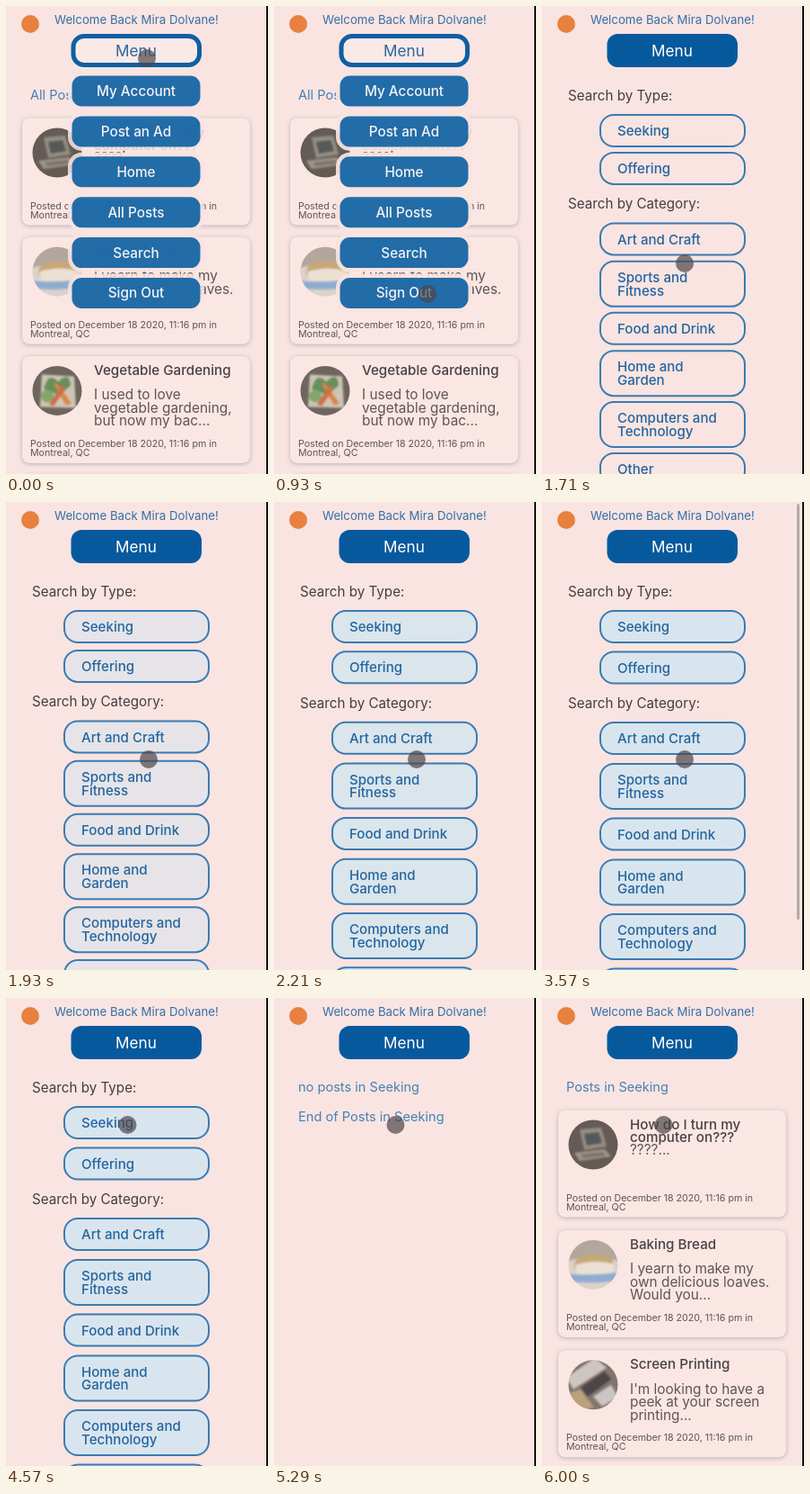
An HTML page that plays this animation: 292 by 520 pixels, repeating every 6.07 s.

```html
<!DOCTYPE html>
<html lang="en">
<head>
<meta charset="utf-8">
<title>Posts and search</title>
<style>
  html, body { margin: 0; width: 100%; height: 100%; overflow: hidden; background: #f9e4e1; }
  svg { display: block; width: 292px; height: 520px; font-family: Inter, "Open Sans", sans-serif; }
  .card { fill: #fae6e3; filter: drop-shadow(0 1px 2.5px rgba(50, 80, 120, .35)); }
  .photo { filter: blur(.8px); }
  .note { font-size: 10.65px; fill: #5d5557; }
  .body { font-size: 15.4px; fill: #5d5557; }
  .title { font-size: 15.2px; font-weight: 500; fill: #484144; }
  .label { font-size: 15.2px; fill: #443d41; }
  .blue { font-size: 14.6px; fill: #4580b5; }
  .item { font-size: 15.3px; font-weight: 500; fill: #f4f2f4; text-anchor: middle; }
  .choice { font-size: 15.1px; font-weight: 500; fill: #23659f; }
</style>
</head>
<body>
<svg viewBox="0 0 292 520">
  <defs>
    <clipPath id="round"><circle r="27.5"/></clipPath>
    <g id="computer" class="photo">
      <rect x="-30" y="-30" width="60" height="60" fill="#645b57"/>
      <path d="M-15-17 9-19 15 2-10 6Z" fill="#968d82"/>
      <path d="M-10-12 6-14 10-2-7 1Z" fill="#56595a"/>
      <path d="M-21 9 13 5 20 13-15 18Z" fill="#a0968b"/>
      <path d="M-14 11 11 8 14 12-11 15Z" fill="#7d746c"/>
    </g>
    <g id="bread" class="photo">
      <rect x="-30" y="-30" width="60" height="60" fill="#b3a69c"/>
      <path d="M-30-4Q0-12 30-4V30H-30Z" fill="#dcd2cb"/>
      <path d="M-21 4Q-22-10-6-11Q12-14 22-5V5Z" fill="#c7a878"/>
      <path d="M-20 0Q2-7 23-1V9L-18 12Z" fill="#ebe0d3"/>
      <path d="M-30 10Q0 13 30 8V17Q0 22-30 18Z" fill="#8facd0"/>
    </g>
    <g id="garden" class="photo">
      <rect x="-30" y="-30" width="60" height="60" fill="#6e655e"/>
      <path d="M-17-18 19-16 21 19-19 18Z" fill="#cfc5b5"/>
      <path d="M-15-2Q-10-22 1-10Q14-22 15-6L3 5Z" fill="#668f5c"/>
      <path d="M-5-9 1-7 16 14 10 16Z" fill="#d98748"/>
      <path d="M5-6 10-3-4 17-9 15Z" fill="#ce6f48"/>
      <circle cx="-11" cy="6" r="7" fill="#84a668"/>
    </g>
    <g id="print" class="photo">
      <rect x="-30" y="-30" width="60" height="60" fill="#81756f"/>
      <path d="M-30-8 2-30 15-19-22 5Z" fill="#cfc5c0"/>
      <path d="M-14 3 13-15 20-6-6 13Z" fill="#4d4546"/>
      <path d="M-30 10-14 5 1 25-18 30Z" fill="#bba07a"/>
      <path d="M0 13 20 0 28 14 10 24Z" fill="#cbc5c3"/>
    </g>
  </defs>
  <rect width="292" height="520" fill="#f9e4e1"/>
  <g id="page">
    <g id="all"></g>
    <g id="seeking"></g>
    <g id="search"></g>
    <g id="empty"></g>
    <g id="header"></g>
    <g id="menu"></g>
  </g>
  <rect id="thumb" x="284" width="3" height="462" rx="1.5" fill="#b5a9a8"/>
  <circle id="cursor" r="10" fill="#4b4648" opacity=".7"/>
  <rect x="290" width="2" height="520" fill="#161214"/>
</svg>
<script>
const LOOP = 6070;
const $ = id => document.getElementById(id);
const set = (el, attrs) => { for (const k in attrs) el.setAttribute(k, attrs[k]); };
const show = (id, on) => set($(id), { display: on ? "inline" : "none" });

function add(parent, tag, attrs, text) {
  const el = document.createElementNS("http://www.w3.org/2000/svg", tag);
  set(el, attrs);
  if (text) el.textContent = text;
  return parent.appendChild(el);
}
const write = (parent, cls, x, y, text) => add(parent, "text", { class: cls, x, y }, text);

// Smooth interpolation through [time, value] stops.
function track(t, stops) {
  if (t <= stops[0][0]) return stops[0][1];
  for (let i = 1; i < stops.length; i++) {
    const [a, v] = stops[i - 1], [b, w] = stops[i];
    if (t < b) {
      const p = (t - a) / (b - a);
      return v + (w - v) * p * p * (3 - 2 * p);
    }
  }
  return stops[stops.length - 1][1];
}
const easeOut = (t, start, span) => 1 - (1 - Math.min(1, Math.max(0, (t - start) / span))) ** 2;

function makeCards(id, heading, posts) {
  write($(id), "blue", 27, 104, heading);
  return [...posts, null].map(post => {
    const g = add($(id), "g", {});
    add(g, "rect", { class: "card", x: 18, width: 254, height: 119, rx: 8 });
    if (post) {
      const [image, titles, lines] = post;
      const pic = add(g, "g", { transform: "translate(57 38.5)", "clip-path": "url(#round)" });
      add(pic, "use", { href: "#" + image });
      titles.forEach((s, i) => write(g, "title", 98, 21 + i * 14.5, s));
      const top = titles.length > 1 ? 49.5 : 48.5;
      lines.forEach((s, i) => write(g, "body", 98, top + i * 14.5, s));
      write(g, "note", 27, 101, "Posted on December 18 2020, 11:16 pm in");
      write(g, "note", 27, 111, "Montreal, QC");
    }
    return g;
  });
}
const placeCards = (cards, pitch) =>
  cards.forEach((g, i) => set(g, { transform: `translate(0 ${124.5 + i * pitch})` }));

const computer = ["computer", ["How do I turn my", "computer on???"], ["????..."]];
const bread = ["bread", ["Baking Bread"], ["I yearn to make my", "own delicious loaves.", "Would you..."]];
const allCards = makeCards("all", "All Posts", [computer, bread,
  ["garden", ["Vegetable Gardening"], ["I used to love", "vegetable gardening,", "but now my bac..."]]]);
const seekingCards = makeCards("seeking", "Posts in Seeking", [computer, bread,
  ["print", ["Screen Printing"], ["I'm looking to have a", "peek at your screen", "printing..."]]]);
placeCards(allCards, 132.2);

write($("empty"), "blue", 27, 104, "no posts in Seeking");
write($("empty"), "blue", 27, 137, "End of Posts in Seeking");

// Header
add($("header"), "circle", { cx: 27, cy: 20, r: 10, fill: "#e8813f" });
set(write($("header"), "blue", 54, 20, "Welcome Back Mira Dolvane!"), { style: "font-size:13.25px;fill:#346fa8" });
const menuButton = add($("header"), "rect", { rx: 12 });
const menuText = add($("header"), "text",
  { x: 145, y: 55.8, "text-anchor": "middle", "font-size": 17.2 }, "Menu");

// Open menu: slightly see-through buttons, each with a page-coloured rim
const items = ["My Account", "Post an Ad", "Home", "All Posts", "Search", "Sign Out"];
const itemBox = (i, grow, attrs) => add($("menu"), "rect", {
  x: 73.5 - grow, y: 77.5 + i * 44.9 - grow, width: 143 + 2 * grow, height: 34 + 2 * grow, rx: 11 + grow, ...attrs
});
const rims = items.map((s, i) => itemBox(i, 4.5, { fill: "#f9e4e1" }));
items.forEach((s, i) => {
  itemBox(i, 0, { fill: "#1565a5", opacity: .94 });
  write($("menu"), "item", 145, 99.9 + i * 44.9, s);
});

// Search form: final top, number of gaps above, lines of text
write($("search"), "label", 29, 104.5, "Search by Type:");
const categoryLabel = write($("search"), "label", 29, 229, "Search by Category:");
const choices = [
  [121, 0, "Seeking"], [166.5, 1, "Offering"], [245, 1, "Art and Craft"],
  [291, 2, "Sports and", "Fitness"], [351.5, 3, "Food and Drink"],
  [397.5, 4, "Home and", "Garden"], [458, 5, "Computers and", "Technology"], [518.5, 6, "Other"]
].map(([top, gaps, ...lines]) => {
  const g = add($("search"), "g", {});
  const height = lines.length > 1 ? 50 : 35;
  const box = add(g, "rect", { x: 65, width: 161, height, rx: 15, fill: "#d9e5ee", stroke: "#3a7bb2", "stroke-width": 2 });
  lines.forEach((s, i) => write(g, "choice", 84, 23.1 + i * 14.7, s));
  return { g, box, top, gaps };
});

function draw(t) {
  const menuOpen = t < 1710, searching = t >= 1710 && t < 4790;
  show("all", menuOpen);
  show("menu", menuOpen);
  show("search", searching);
  show("empty", t >= 4790 && t < 5430);
  show("seeking", t >= 5430);

  set(menuButton, menuOpen
    ? { x: 75, y: 33.5, width: 140.5, height: 32, fill: "#fbe9e7", stroke: "#0e5fa3", "stroke-width": 5 }
    : { x: 72.5, y: 31, width: 145.5, height: 37, fill: "#07599e", stroke: "none" });
  set(menuText, { fill: menuOpen ? "#28679f" : "#fff" });
  const rimOpacity = track(t, [[0, .85], [640, .92]]);
  rims.forEach(rim => set(rim, { opacity: rimOpacity }));

  const grow = easeOut(t, 1710, 650), shift = -3.6 * (1 - grow);
  set(categoryLabel, { y: 229 + shift });
  for (const { g, box, top, gaps } of choices) {
    set(g, { transform: `translate(0 ${top + gaps * shift})` });
    set(box, { "fill-opacity": grow });
  }

  const scroll = track(t, [[2430, 0], [2720, 51], [2860, 53], [2930, 53], [3370, 0]]);
  set($("page"), { transform: `translate(0 ${-scroll})` });
  set($("thumb"), {
    y: 2 + scroll * .9,
    opacity: track(t, [[2430, 0], [2500, 1], [3600, 1], [3900, 0]])
  });

  const settle = easeOut(t, 5430, 640);
  placeCards(seekingCards, 127 + 6.5 * settle);
  seekingCards.forEach(g => set(g, { opacity: Math.min(1, settle * 1.3) }));

  set($("cursor"), {
    cx: track(t, [[40, 157], [640, 168], [880, 172], [1230, 159], [3580, 159], [4150, 135.5]]),
    cy: track(t, [[40, 58], [640, 312], [880, 322], [1230, 286], [3580, 286], [4150, 141]])
  });
}

const start = performance.now();
function tick() {
  draw((performance.now() - start) % LOOP);
  requestAnimationFrame(tick);
}
tick();
</script>
</body>
</html>
```
